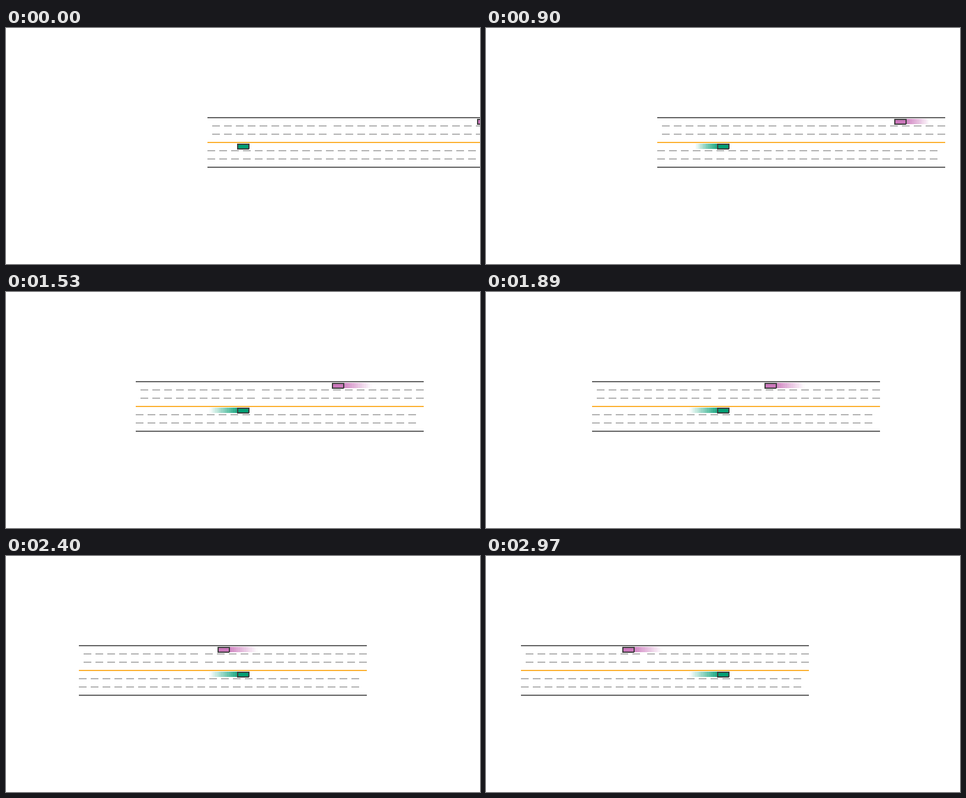
An HTML page with a canvas for the animation above (3000 ms loop, 800 by 400 pixels).

```html
<!DOCTYPE html>
<html lang="en">
<head>
<meta charset="utf-8">
<title>Two-way road</title>
<style>
  html, body { margin: 0; width: 100%; height: 100%; overflow: hidden; background: #fff; }
  canvas { display: block; width: 800px; height: 400px; }
</style>
</head>
<body>
<canvas id="stage" width="800" height="400"></canvas>
<script>
const ctx = document.getElementById('stage').getContext('2d');

const LOOP = 3000, STEP = 30, HOLD = 60;
const CRUISE = 10 / 3;          // top speed, pixels per step
const ROAD_X = 340.8, ROAD_W = 486, TRAIL = 14;
const EDGE = '#606060', DASH = '#b0b0b0', CENTER = '#fcb02f', OUTLINE = '#3c3c3c';

// ramp: steps until cruising; lag: pixels lost while speeding up
const ego = { x: 390, y: 196, dir: 1, ramp: 38.5, lag: 42.45, color: '#029e73' };
const oncoming = { x: 795.65, y: 154, dir: -1, ramp: 34, lag: 39.5, color: '#cc78bc' };

function travelled(car, step) {
  const k = Math.max(0, step);
  const left = Math.max(0, 1 - k / car.ramp);
  const power = CRUISE * car.ramp / car.lag;
  return CRUISE * k - car.lag * (1 - left ** power);
}

function rect(x, y, w, h, color) {
  ctx.fillStyle = color;
  ctx.fillRect(x, y, w, h);
}

function dashes(x, y, count) {
  for (let i = 0; i < count; i++) rect(x + 20 * i, y, 13, 2, DASH);
}

function drawRoad(x) {
  for (const y of [151, 235]) rect(x, y, ROAD_W, 2, EDGE);
  for (const y of [165, 179]) {
    dashes(x + 8, y, 10);
    dashes(x + 213, y, 14);
  }
  for (const y of [207, 221]) dashes(x, y, 24);
  rect(x, 193, ROAD_W, 2, CENTER);
}

function drawTrail(car, x, step) {
  const now = travelled(car, step);
  const back = i => Math.round(now - travelled(car, step - i));
  for (let i = 0; i < TRAIL; i++) {
    const near = back(i), far = back(i + 1);
    ctx.globalAlpha = 0.88 * (1 - (i + 0.5) / TRAIL);
    rect(car.dir > 0 ? x - far : x + 21 + near, car.y, far - near, 9, car.color);
  }
  ctx.globalAlpha = 1;
}

function drawCar(car, x, step) {
  drawTrail(car, x, step);
  rect(x, car.y, 21, 9, OUTLINE);
  rect(x, car.y + 9, 20, 1, OUTLINE);
  rect(x + 2, car.y + 2, 17, 6, car.color);
}

function draw(time) {
  const step = Math.max(0, Math.floor((time % LOOP - HOLD) / STEP));
  const camera = travelled(ego, step);
  ctx.clearRect(0, 0, 800, 400);
  drawRoad(Math.floor(ROAD_X - camera));
  drawCar(ego, ego.x, step);
  drawCar(oncoming, Math.floor(oncoming.x - camera - travelled(oncoming, step)), step);
}

const start = performance.now();
function tick() {
  draw(performance.now() - start);
  requestAnimationFrame(tick);
}
tick();
</script>
</body>
</html>
```
